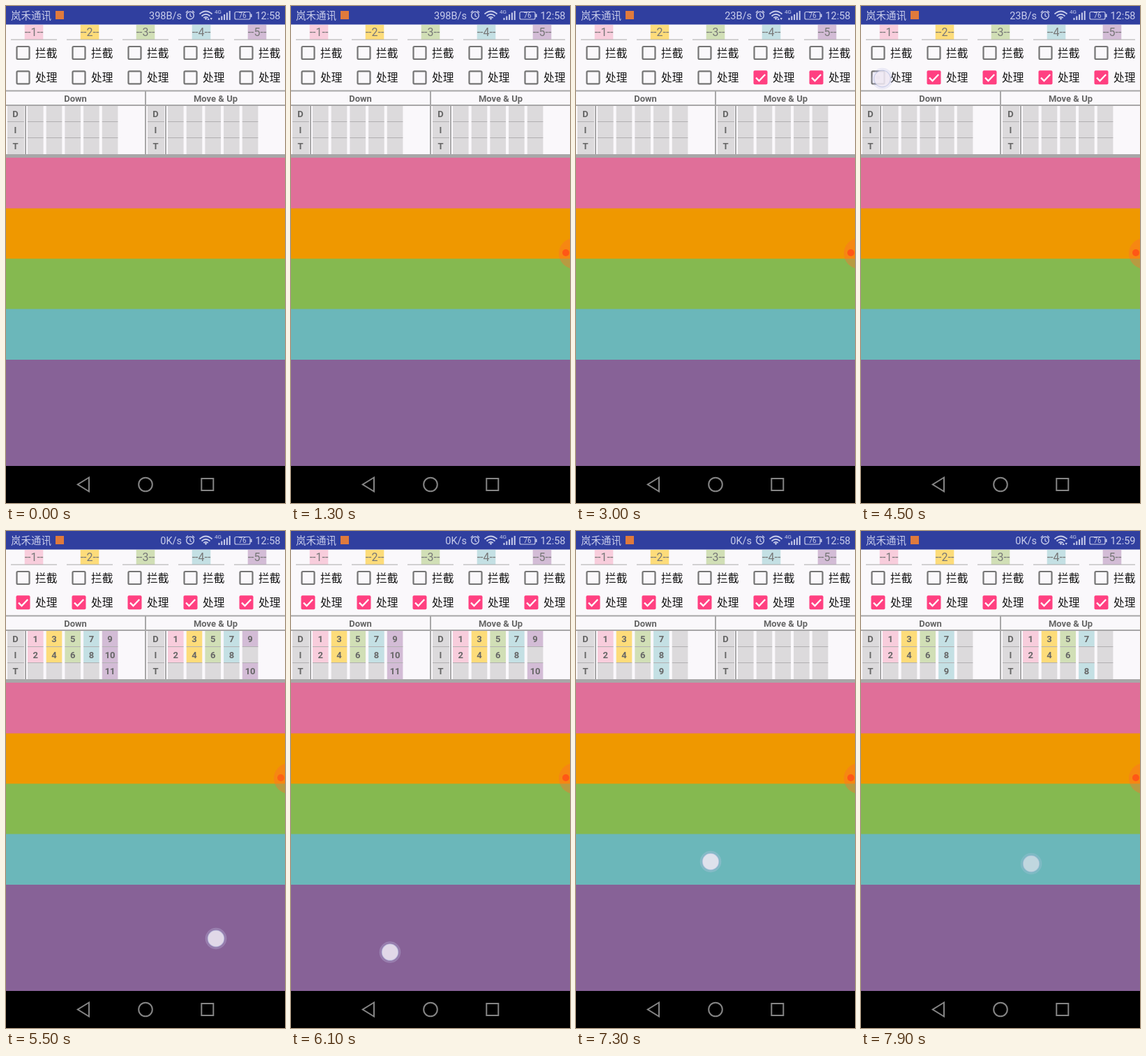
Recreate the animation shown at these times as an HTML page. Size 400 by 711 pixels, loop 8000 ms.

```html
<!DOCTYPE html>
<html lang="zh">
<head>
<meta charset="utf-8">
<title>Touch dispatch demo</title>
<style>
  html, body { margin: 0; width: 100%; height: 100%; overflow: hidden; background: #000; }
  svg { display: block; width: 400px; height: 711px; }
  text { font-family: Roboto, "Noto Sans CJK SC", "Noto Sans CJK", sans-serif; }
  .status { font-size: 14.5px; fill: #c9cdeb; }
  .head { font-size: 16px; fill: #777; text-anchor: middle; }
  .label { font-size: 15.7px; fill: #141414; }
  .cell { font-size: 13px; font-weight: 700; fill: #666; text-anchor: middle; }
</style>
</head>
<body>
<svg id="stage" viewBox="0 0 400 711"></svg>
<script>
const LOOP = 8000;
const TINTS = ['#f8cddc', '#fddc7a', '#d1dfb6', '#c4e0e4', '#d3bcd6'];
const GREY = '#a8a7a8', BLANK = '#dcdadc', ICON = '#c9cdeb';
const stage = document.getElementById('stage');

function add(tag, attrs, parent = stage) {
  const el = document.createElementNS('http://www.w3.org/2000/svg', tag);
  for (const key in attrs) el.setAttribute(key, attrs[key]);
  return parent.appendChild(el);
}
const rect = (x, y, width, height, fill, parent) =>
  add('rect', { x, y, width, height, fill }, parent);
const circle = (cx, cy, r, fill, parent) => add('circle', { cx, cy, r, fill }, parent);
const line = (d, stroke, width, parent) =>
  add('path', { d, stroke, 'stroke-width': width, fill: 'none' }, parent);
function label(x, y, cls, str, parent) {
  const el = add('text', { x, y, class: cls }, parent);
  el.textContent = str;
  return el;
}

// Backdrop and colour bands
rect(0, 0, 400, 711, '#000');
rect(0, 26, 400, 192, '#faf8fb');
[['#e06f99', 217], ['#ef9800', 289.5], ['#85b950', 361.5], ['#6bb7ba', 433.5], ['#876297', 506], ['#000', 658]]
  .forEach(([fill, y]) => rect(0, y, 400, 711 - y, fill));

// Status bar
rect(0, 0, 400, 26.5, '#303f9f');
label(7, 19, 'status', '岚禾通讯');
rect(71, 7, 12, 12, '#e07a3c');
const speed = label(252, 19, 'status', '');
speed.setAttribute('text-anchor', 'end');
const clock = label(393.5, 19, 'status', '');
clock.setAttribute('text-anchor', 'end');
add('circle', { cx: 264, cy: 13.5, r: 5.3, fill: 'none', stroke: ICON, 'stroke-width': 1.4 });
line('M264 10.5V14L266.3 15.5M257.8 9.5L261 6.8M267 6.8L270.2 9.5', ICON, 1.3);
line('M277.5 11.5Q286.5 3.5 295.5 11.5M280.5 14.5Q286.5 9 292.5 14.5M283.3 17Q286.5 14.2 289.7 17', ICON, 1.7);
add('path', { d: 'M284.8 18L286.5 16.5L288.2 18L286.5 20Z', fill: ICON });
const traffic = add('path', { d: 'M290 17L292 20H288.5ZM292.5 17H296L294.2 20Z', fill: ICON });
label(299, 11, 'status', '4G').style.fontSize = '8px';
for (let i = 0; i < 5; i++) rect(304.5 + i * 3.8, 17 - i * 2.5, 2, 3 + i * 2.5, ICON);
add('rect', { x: 328, y: 8.5, width: 22, height: 10.5, rx: 2, fill: 'none', stroke: ICON, 'stroke-width': 1.2 });
rect(350.5, 11.5, 2, 4.5, ICON);
const charge = label(339, 17.4, 'status', '76');
charge.style.fontSize = '10px';
charge.setAttribute('text-anchor', 'middle');

// Checkbox columns
function checkbox(x, y) {
  const ripple = circle(x, y, 0, '#000');
  const off = add('rect', { x: x - 9, y: y - 9, width: 18, height: 18, rx: 1.5, fill: 'none', stroke: '#757575', 'stroke-width': 2.2 });
  const on = add('g', {});
  add('rect', { x: x - 10, y: y - 10, width: 20, height: 20, rx: 2, fill: '#ff4081' }, on);
  line(`M${x - 6.5} ${y + .3}l4.5 4.5l8.7 -9`, '#fff', 2.2, on);
  on.style.display = 'none';
  return { ripple, off, on };
}
const boxes = TINTS.map((tint, i) => {
  const x = 80 * i;
  rect(x + 26.7, 27, 26.6, 21, tint);
  label(x + 40, 43.3, 'head', `--${i + 1}--`);
  rect(x + 7, 47.6, 66, 1, '#aaa');
  checkbox(x + 24.5, 67);
  label(x + 42, 73, 'label', '拦截');
  const box = checkbox(x + 24.5, 102.3);
  label(x + 42, 108.3, 'label', '处理');
  return box;
});

// Result tables
const ROW_Y = [143, 166, 189];
const baseline = row => ROW_Y[row] + 16;
function table(x, title) {
  label(x + 99.5, 136.6, 'cell', title);
  rect(x + 2, 143, 24, 69, BLANK);
  ['D', 'I', 'T'].forEach((s, row) => label(x + 13.5, baseline(row), 'cell', s));
  rect(x + 27, 142, 2, 70, GREY);
  const cells = TINTS.map((_, i) => {
    const left = x + 31 + i * 26.7;
    return ROW_Y.map((y, row) => ({
      bg: rect(left, y, 22.6, 23, BLANK),
      num: label(left + 11.3, baseline(row), 'cell', '')
    }));
  });
  for (const y of [165, 188]) {
    rect(x + 2, y, 24, 1, '#b2b0b2');
    TINTS.forEach((_, i) => rect(x + 31 + i * 26.7, y, 22.6, 1, '#b2b0b2'));
  }
  return cells;
}
rect(0, 120.4, 400, 2, GREY);
rect(0, 141, 400, 2, GREY);
const down = table(0, 'Down');
const move = table(201, 'Move & Up');
rect(199, 121, 2, 92, GREY);
rect(0, 212, 400, 5, GREY);

// Dispatch walks to the given depth; a move skips the last interception.
function fillTable(cells, depth, isMove) {
  cells.forEach((col, i) => {
    const last = i === depth - 1;
    const values = i >= depth ? [] : [
      2 * i + 1,
      last && isMove ? '' : 2 * i + 2,
      last ? 2 * i + (isMove ? 2 : 3) : ''
    ];
    col.forEach(({ bg, num }, row) => {
      const value = values[row] || '';
      bg.setAttribute('fill', value ? TINTS[i] : BLANK);
      num.textContent = value;
    });
  });
}

// Navigation bar
line('M119 674.5L102.8 684.5L119 694.5Z', '#858585', 2);
add('circle', { cx: 200, cy: 684.5, r: 9.8, fill: 'none', stroke: '#858585', 'stroke-width': 2 });
add('rect', { x: 280.3, y: 676, width: 17, height: 17, fill: 'none', stroke: '#858585', 'stroke-width': 2 });

// Floating button at the screen edge
const floater = add('g', {});
circle(406, 354, 22, 'rgba(255,112,45,.42)', floater);
const dot = circle(394, 353, 5, '#ff5716', floater);

// Touch marker
const touch = add('g', {});
add('circle', { r: 15, fill: 'rgba(200,200,235,.24)', stroke: 'rgba(190,195,230,.2)', 'stroke-width': 1 }, touch);
add('circle', { r: 11.8, fill: 'rgba(240,233,243,.84)', stroke: 'rgba(170,180,220,.55)', 'stroke-width': 1.2 }, touch);

// Timelines: [start, value] steps, and [time, x, y] touch paths
const SPEED = [[0, '398B/s'], [1700, '23B/s'], [4700, '0K/s']];
const CLOCK = [[0, '12:58'], [7600, '12:59']];
const TRAFFIC = [[0, 1], [1000, 0], [2700, 1], [3700, 0], [7600, 1]];
const DOWN = [[0, 0], [4950, 5], [6450, 4]];
const MOVE = [[0, 0], [5250, 5], [6450, 0], [7450, 4]];
const TAPS = [[4, 2050], [3, 2650], [2, 3250], [1, 3850], [0, 4450]];
const TAP_TIME = 160;
const PATHS = TAPS.map(([i, t]) => [[t, 30.5 + 80 * i, 104], [t + TAP_TIME, 30.5 + 80 * i, 104]]).concat([
  [[4950, 190, 596], [5150, 194, 596], [5500, 301, 583], [5750, 280, 592], [6150, 136, 603], [6200, 136, 603]],
  [[6450, 192, 474], [6700, 193, 473], [7300, 193, 473], [7550, 215, 481], [7800, 244, 476], [8000, 244, 476]]
]);

const stepAt = (steps, t) => steps.filter(s => s[0] <= t).pop()[1];
const clamp = v => Math.max(0, Math.min(1, v));
const ease = v => v * v * (3 - 2 * v);

function pointAt(path, t) {
  const i = Math.max(1, path.findIndex(p => p[0] >= t));
  const [a, b] = [path[i - 1], path[i]];
  const k = ease(clamp((t - a[0]) / (b[0] - a[0])));
  return [a[1] + (b[1] - a[1]) * k, a[2] + (b[2] - a[2]) * k];
}

function draw(t) {
  speed.textContent = stepAt(SPEED, t);
  clock.textContent = stepAt(CLOCK, t);
  traffic.style.opacity = stepAt(TRAFFIC, t);
  fillTable(down, stepAt(DOWN, t), false);
  fillTable(move, stepAt(MOVE, t), true);

  for (const [i, start] of TAPS) {
    const { ripple, off, on } = boxes[i];
    const checked = t >= start + TAP_TIME;
    on.style.display = checked ? '' : 'none';
    off.style.display = checked ? 'none' : '';
    const age = t - start;
    ripple.setAttribute('r', 21 * ease(clamp(age / 220)));
    ripple.setAttribute('fill', checked ? '#ff4081' : '#000');
    ripple.style.opacity = age < 0 ? 0 : .12 * (1 - clamp((age - 140) / 200));
  }

  const slide = ease(clamp((t - 300) / 400));
  floater.setAttribute('transform', `translate(${24 * (1 - slide)} 0)`);
  dot.style.opacity = t >= 5400 && t < 5700 ? .75 : 1;

  const path = PATHS.find(p => t >= p[0][0] && t <= p[p.length - 1][0]);
  touch.style.display = path ? '' : 'none';
  if (path) touch.setAttribute('transform', `translate(${pointAt(path, t)})`);
  touch.style.opacity = 1 - .5 * clamp((t - 7800) / 200);
}

function tick() {
  draw(performance.now() % LOOP);
  requestAnimationFrame(tick);
}
tick();
</script>
</body>
</html>
```
